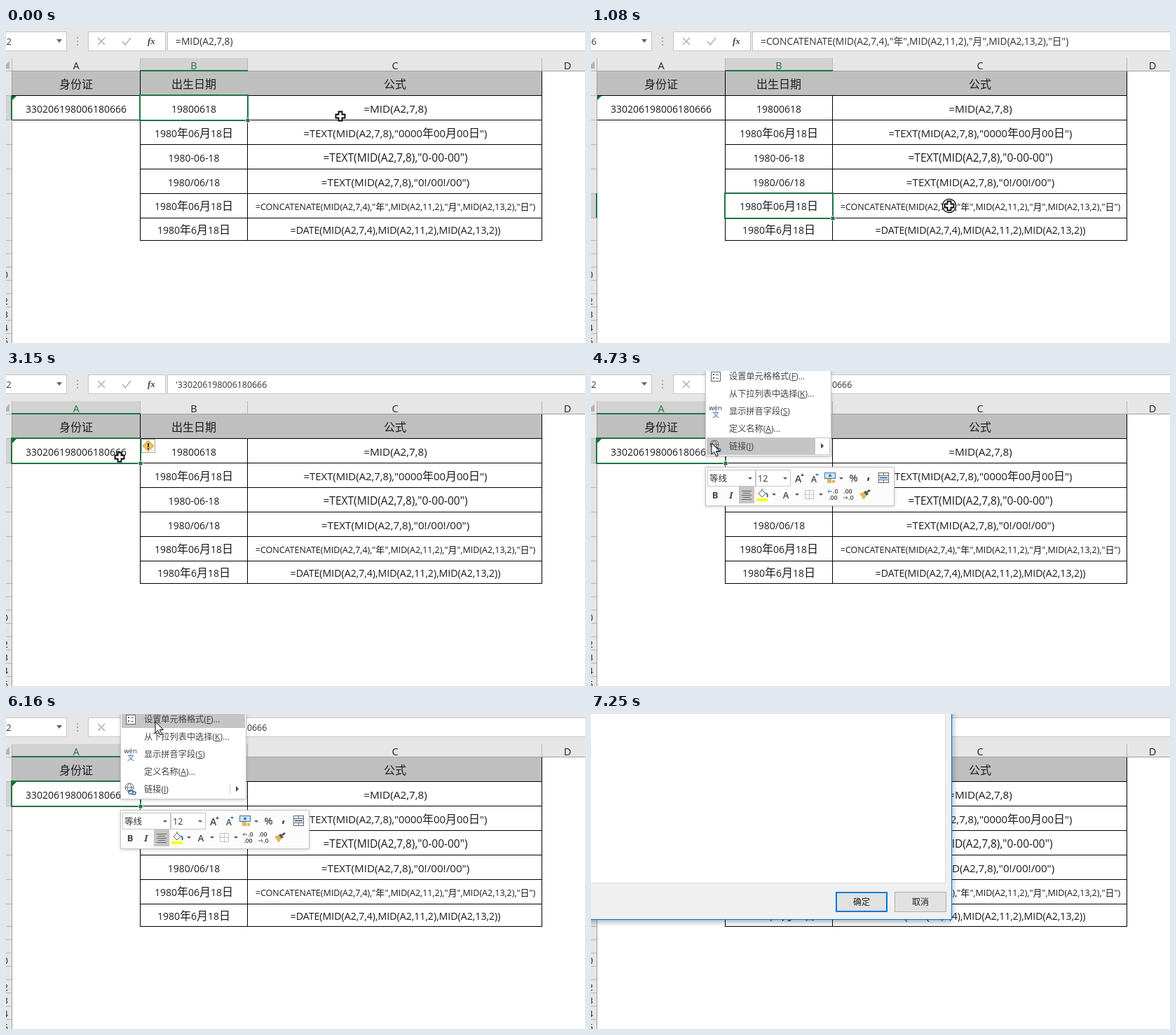
These frames come from a looping animation (826 px wide and 450 px high, 8000 ms). An HTML page:

```html
<!DOCTYPE html>
<html lang="zh">
<head>
<meta charset="utf-8">
<style>
html, body { margin: 0; width: 100%; height: 100%; overflow: hidden; background: #fff; }
svg { display: block; width: 826px; height: 450px; font-family: "Open Sans", "Noto Sans CJK SC", "Noto Sans CJK", sans-serif; }
text { white-space: pre; }
.shadow { filter: drop-shadow(0 1px 2px #0003); }
.deep { filter: drop-shadow(0 2px 5px #0006); }
</style>
</head>
<body>
<svg id="stage" viewBox="0 0 826 450"></svg>
<script>
const LOOP = 8000, GREEN = '#217346', BLUE = '#0078d7';
const colX = { A: 8, B: 191, C: 344, D: 764 }, colEnd = { A: 191, B: 344, C: 764 };
const rowY = [61, 96, 131, 166, 201, 236, 271, 303];
const baseline = [86, 121, 156, 191, 226, 260, 294];
const ID = '330206198006180666';

// Per row: date shown in B, formula shown in C, latin size and CJK size of the formula
const rows = [
  ['19800618', '=MID(A2,7,8)', 15.3, 16],
  ['1980年06月18日', '=TEXT(MID(A2,7,8),"0000年00月00日")', 14.9, 16],
  ['1980-06-18', '=TEXT(MID(A2,7,8),"0-00-00")', 15.5, 16],
  ['1980/06/18', '=TEXT(MID(A2,7,8),"0!/00!/00")', 15.2, 16],
  ['1980年06月18日', '=CONCATENATE(MID(A2,7,4),"年",MID(A2,11,2),"月",MID(A2,13,2),"日")', 12.5, 13],
  ['1980年6月18日', '=DATE(MID(A2,7,4),MID(A2,11,2),MID(A2,13,2))', 14.15, 16],
];

// Time, pointer position, and what else changes then
const script = [
  [0, 477, 126, { sel: 'B2', pointer: 'cross' }],
  [150, 477, 126, { sel: 'C2' }],
  [270, 403, 145],
  [420, 295, 172],
  [570, 285, 190, { sel: 'B4' }],
  [690, 278, 222],
  [810, 275, 253],
  [960, 380, 254, { sel: 'B6' }],
  [1080, 511, 254, { click: true }],
  [1200, 511, 254, { sel: 'C6', click: false }],
  [1350, 430, 240],
  [1470, 300, 190],
  [1590, 141, 140],
  [1740, 115, 117, { sel: 'A2' }],
  [2280, 165, 95, { warn: true }],
  [2410, 222, 69],
  [2560, 240, 40, { pointer: 'arrow' }],
  [2680, 265, 11, { pointer: 'beam' }],
  [2990, 200, 52, { pointer: 'down', hover: true }],
  [3150, 162, 123, { pointer: 'cross', hover: false }],
  [3430, 163, 122],
  [3580, 163, 122, { click: true }],
  [3730, 163, 122, { click: false, menu: true, pointer: 'arrow' }],
  [4730, 172, 103],
  [4850, 185, 88],
  [5000, 192, 78],
  [5120, 198, 66],
  [5240, 203, 52],
  [5370, 207, 38],
  [5490, 211, 20],
  [5640, 212, 14],
  [5770, 213, 11],
  [6040, 213, 11, { click: true }],
  [6160, 213, 11, { click: false }],
  [6310, 213, 11, { menu: false, warn: false }],
  [6710, 213, 11, { dialog: .5 }],
  [6830, 214, 8, { dialog: .9 }],
  [6980, 216, 3, { dialog: 1 }],
  [7100, 217, 1],
  [7250, 217, 1, { pointer: '' }],
];

const box = (x, y, x2, y2, fill, stroke = 'none', w = 1) =>
  `<rect x="${x}" y="${y}" width="${x2 - x}" height="${y2 - y}" fill="${fill}" stroke="${stroke}" stroke-width="${w}"/>`;
const path = (d, fill = 'none', stroke = 'none', w = 1, more = '') =>
  `<path d="${d}" fill="${fill}" stroke="${stroke}" stroke-width="${w}" ${more}/>`;
const text = (x, y, s, size, cjk = size, fill = '#1c1c1c', more = '') =>
  `<text x="${x}" y="${y}" font-size="${size}" fill="${fill}" ${more}>` +
  s.replace(/[\u4e00-\u9fff]+/g, m => `<tspan font-size="${cjk}">${m}</tspan>`) + '</text>';
const mid = (x, y, s, size, cjk, fill, more = '') => text(x, y, s, size, cjk, fill, 'text-anchor="middle" ' + more);
const drop = (x, y) => path(`M${x - 3} ${y - 1}h6l-3 3z`, '#555');
const hline = (x, x2, y) => box(x, y, x2, y + 1, '#000');

function formulaBar(sel) {
  const row = rows[sel[1] - 2];
  const s = sel[0] == 'A' ? "'" + ID : (sel[0] == 'C' ? "'" : '') + row[1];
  return box(0, 0, 826, 61, '#e6e6e6') +
    box(-2, 5.5, 86.5, 32.5, '#fff', '#c6c6c6') + box(117.5, 5.5, 227.5, 32.5, '#fff', '#c6c6c6') +
    box(230.5, 5.5, 830, 32.5, '#fff', '#c6c6c6') +
    text(-8, 24, sel, 13, 13, '#333') + path('M72 16h8l-4 5z', '#666') +
    [13, 18, 23].map(y => box(101, y, 103, y + 2, '#a6a6a6')).join('') +
    path('M131 14l10 10M141 14l-10 10M166 19l4 5 8-10', 'none', '#b0b0b0', 1.5) +
    text(202, 23, 'fx', 13, 13, '#444', 'font-family="Liberation Serif, serif" font-style="italic" font-weight="700"') +
    text(242, 23.5, s, sel[0] == 'A' ? 12.4 : 13.8, 13.8, '#333');
}

function headers(sel, hover) {
  const r = sel[1] - 1;
  let s = box(0, 61, 8, 450, '#e6e6e6') + path('M5 47v11h-11z', '#b4b4b4');
  s += box(0, rowY[r] + 1, 8, rowY[r + 1], '#d2d2d2');
  s += box(colX[sel[0]] + 1, 43, colEnd[sel[0]], 61, '#d2d2d2');
  if (hover) s += box(192, 43, 344, 61, '#9fd5b7');
  for (const x of Object.values(colX)) s += box(x, 43, x + 1, 61, '#b5b5b5');
  s += box(0, 61, 826, 62, '#9f9f9f') + box(8, 61, 9, 450, '#9f9f9f');
  const edges = [...rowY];
  for (let y = 322; y < 450; y += 19) edges.push(y);
  s += edges.map(y => box(0, y, 8, y + 1, '#b5b5b5')).join('');
  for (let i = 0; i < 6; i++) s += text(-4.5, 357 + i * 19, '' + i, 13, 13, '#222');
  [['A', 100], ['B', 268], ['C', 555], ['D', 801]].forEach(([c, x]) =>
    s += mid(x, 59, c, 14.5, 14.5, c == sel[0] ? GREEN : '#222'));
  return s + box(colX[sel[0]], 60, colEnd[sel[0]] + 1, 62, GREEN) + box(7, rowY[r], 9, rowY[r + 1], GREEN);
}

function table() {
  let s = box(9, 62, 764, 96, '#bfbfbf');
  s += mid(100, 86, '身份证', 16) + mid(268, 86, '出生日期', 16) + mid(555, 86, '公式', 16);
  s += hline(9, 765, 96) + hline(9, 765, 131);
  for (const y of rowY.slice(3)) s += hline(191, 765, y);
  for (const [x, top] of [[191, 62], [344, 96], [764, 62]]) s += box(x, top, x + 1, 304, '#000');
  s += mid(100, 121, ID, 14) + path('M9 97h6l-6 6z', '#0c6b2f');
  rows.forEach(([date, formula, size, cjk], i) =>
    s += mid(268, baseline[i + 1], date, 14, 16) + mid(555.5, baseline[i + 1], formula, size, cjk));
  return s;
}

function selection(sel) {
  const x = colX[sel[0]], x2 = colEnd[sel[0]] + 1, y = rowY[sel[1] - 1], y2 = rowY[sel[1]] + 1;
  return box(x, y, x2, y2, 'none', GREEN, 2) + box(x2 - 3, y2 - 3, x2 + 3, y2 + 3, GREEN, '#fff');
}

const warning = () => box(193.5, 97.5, 212.5, 116.5, '#f6f6f6', '#ababab') +
  path('M203 99l8 8-8 8-8-8z', '#e9bd62', '#d9a744') + mid(203, 111.5, '!', 12, 12, '#222', 'font-weight="700"');

function menu(tipY) {
  const hot = Math.floor((tipY + 5) / 25), key = k => `(<tspan text-decoration="underline">${k}</tspan>)`;
  const items = ['设置单元格格式' + key('F') + '...', '从下拉列表中选择' + key('K') + '...',
    '显示拼音字段' + key('S'), '定义名称' + key('A') + '...', '链接' + key('I')];
  let s = '<g class="shadow">' + box(163.5, -5, 342.5, 121.5, '#fff', '#c6c6c6') + '</g>';
  if (hot < 5) s += box(165, hot * 25 - 5, 341, hot * 25 + 20, '#c5c5c5');
  if (hot == 4) s += box(320, 96, 340, 119, '#fff');
  else s += box(319, 100, 320, 115, '#d0d0d0');
  items.forEach((t, i) => s += text(197, 12 + i * 25, t, 12, 12.2, '#444'));
  s += path('M328 103l4 4-4 4z', '#444');
  s += box(171.5, 1.5, 184.5, 14.5, '#fff', '#666') + path('M174 5h2M174 10h2', 'none', '#2b6cb0', 2) + path('M178 5.5h4M178 10.5h4', 'none', '#666');
  s += mid(177.5, 56, 'wén', 9.5, 9.5, '#333') + mid(178, 66, '文', 10, 10, '#2b6cb0');
  s += `<circle cx="176" cy="105" r="6" fill="none" stroke="#666"/>` + path('M170 105h12M176 99c-4 4-4 8 0 12c4-4 4-8 0-12', 'none', '#666');
  return s + path('M175 111a2 2 0 0 1 2-2h2a2 2 0 0 1 0 5h-2a2 2 0 0 1-2-3M180 111h3a2 2 0 0 1 0 4h-3', 'none', '#2f6ea8', 1.5);
}

function toolbar() {
  const dark = '#444', bold = 'font-weight="700"';
  let s = '<g class="shadow">' + box(163.5, 137.5, 432.5, 192.5, '#fcfcfc', '#c6c6c6') + '</g>';
  s += box(166.5, 141.5, 234.5, 164.5, '#fff', '#c6c6c6') + box(235.5, 141.5, 284.5, 164.5, '#fff', '#c6c6c6');
  s += text(169, 158, '等线', 12.5, 12.5, '#333') + text(238, 158, '12', 12.5, 12.5, '#333') + drop(227, 153) + drop(277, 153);
  s += text(291, 159, 'A', 14, 14, dark, 'font-weight="600"') + path('M299 150l2.5-4 2.5 4z', '#2b6cb0');
  s += text(314, 159, 'A', 12, 12, dark, 'font-weight="600"') + path('M320 147l2.5 3 2.5-3z', '#2b6cb0');
  s += box(333.5, 145.5, 348.5, 153.5, '#cfe3f3', '#3b78ad') + `<circle cx="341" cy="149.5" r="2" fill="#3b78ad"/>`;
  s += path('M337 154h6v6h-6zM344 156h4v4h-4z', '#e2b659') + drop(357, 153);
  s += mid(374.5, 158, '%', 14, 14, dark, 'font-weight="600"') + mid(396, 154, ',', 19, 19, dark, bold);
  s += box(410.5, 145.5, 424.5, 159.5, '#fff', '#666') + path('M410 149.5h15M410 155.5h15M417.5 146v3M417.5 156v3', 'none', '#666') + path('M412 152.5h11', 'none', '#2b6cb0', 2);
  s += mid(177, 182, 'B', 13, 13, dark, bold) + mid(199.5, 182, 'I', 13, 13, dark, 'font-weight="600" font-style="italic" font-family="Noto Serif, serif"');
  s += box(211, 165, 233, 189, '#c5c5c5') + path('M215 171.5h14M217 174.5h10M215 177.5h14M217 180.5h10M215 183.5h14', 'none', '#666');
  s += path('M239 175l5-5 5 5-5 5zM244 170v-2', '#fff', '#555') + path('M250 174q3 4 1 6', 'none', '#2b6cb0', 2) + box(236, 182, 252, 186, '#ff0') + drop(261, 176);
  s += mid(278, 182, 'A', 13, 13, dark, 'font-weight="600"') + drop(294, 176);
  s += path('M305.5 170.5h12v12h-12zM305 176.5h13M311.5 170v13', 'none', '#888', 1, 'stroke-dasharray="1 1"') + drop(328, 176);
  s += text(345, 175, '.0', 9, 9, dark, 'font-weight="600"') + text(339, 184, '.00', 9, 9, dark, 'font-weight="600"') + path('M344 172h-6l2-2m-2 2l2 2', 'none', '#2b6cb0');
  s += text(360, 175, '.00', 9, 9, dark, 'font-weight="600"') + text(367, 184, '.0', 9, 9, dark, 'font-weight="600"') + path('M360 181h6l-2-2m2 2l-2 2', 'none', '#2b6cb0');
  return s + path('M383 175l6-2 4 5-4 6z', '#e2b659') + path('M389 173l3-2 4 5-3 2zM393 172l4-3 2 2-4 3z', '#555');
}

function dialog(p) {
  const k = .93 + .07 * p;
  return `<g class="deep" opacity="${p}" transform="translate(${(1 - k) * 250} ${(1 - k) * 40}) scale(${k})">` +
    box(-20, -20, 514.5, 293.5, '#f0f0f0', BLUE) + box(-10, -10, 505.5, 241.5, '#fff', '#dcdcdc') +
    box(350, 255, 422, 282, '#e1e1e1', BLUE, 2) + box(433.5, 254.5, 506.5, 282.5, '#e1e1e1', '#adadad') +
    mid(386, 273, '确定', 12) + mid(470, 273, '取消', 12) + '</g>';
}

function pointer(s) {
  const shapes = {
    cross: path('M-2.5-6.5h5v4h4v5h-4v4h-5v-4h-4v-5h4z', '#fff', '#000', 1.8),
    arrow: path('M0 0v16l3.7-3.5 3 6.5 2.6-1.2-3-6.3h5.2z', '#fff', '#000'),
    beam: path('M-3-8h6M0-8v16M-3 8h6', 'none', '#000'),
    down: path('M-1-6h2v7h4l-5 6-5-6h4z', '#000'),
  };
  const ring = s.click ? `<circle r="9.7" fill="${s.menu ? 'none' : '#fff'}" stroke="#000" stroke-width="1.3"/>` : '';
  return `<g transform="translate(${s.x} ${s.y})">${ring}${shapes[s.pointer] || ''}</g>`;
}

function draw(s) {
  return formulaBar(s.sel) + headers(s.sel, s.hover) + table() + selection(s.sel) +
    (s.warn ? warning() : '') + (s.menu ? menu(s.y) + toolbar() : '') +
    (s.dialog ? dialog(s.dialog) : '') + pointer(s);
}

const stage = document.getElementById('stage');
let shown = -1;
function tick() {
  const t = performance.now() % LOOP;
  const past = script.filter(step => step[0] <= t);
  if (past.length != shown) {
    shown = past.length;
    const [, x, y] = past[shown - 1];
    stage.innerHTML = draw(Object.assign({ x, y }, ...past.map(step => step[3])));
  }
  requestAnimationFrame(tick);
}
tick();
</script>
</body>
</html>
```
